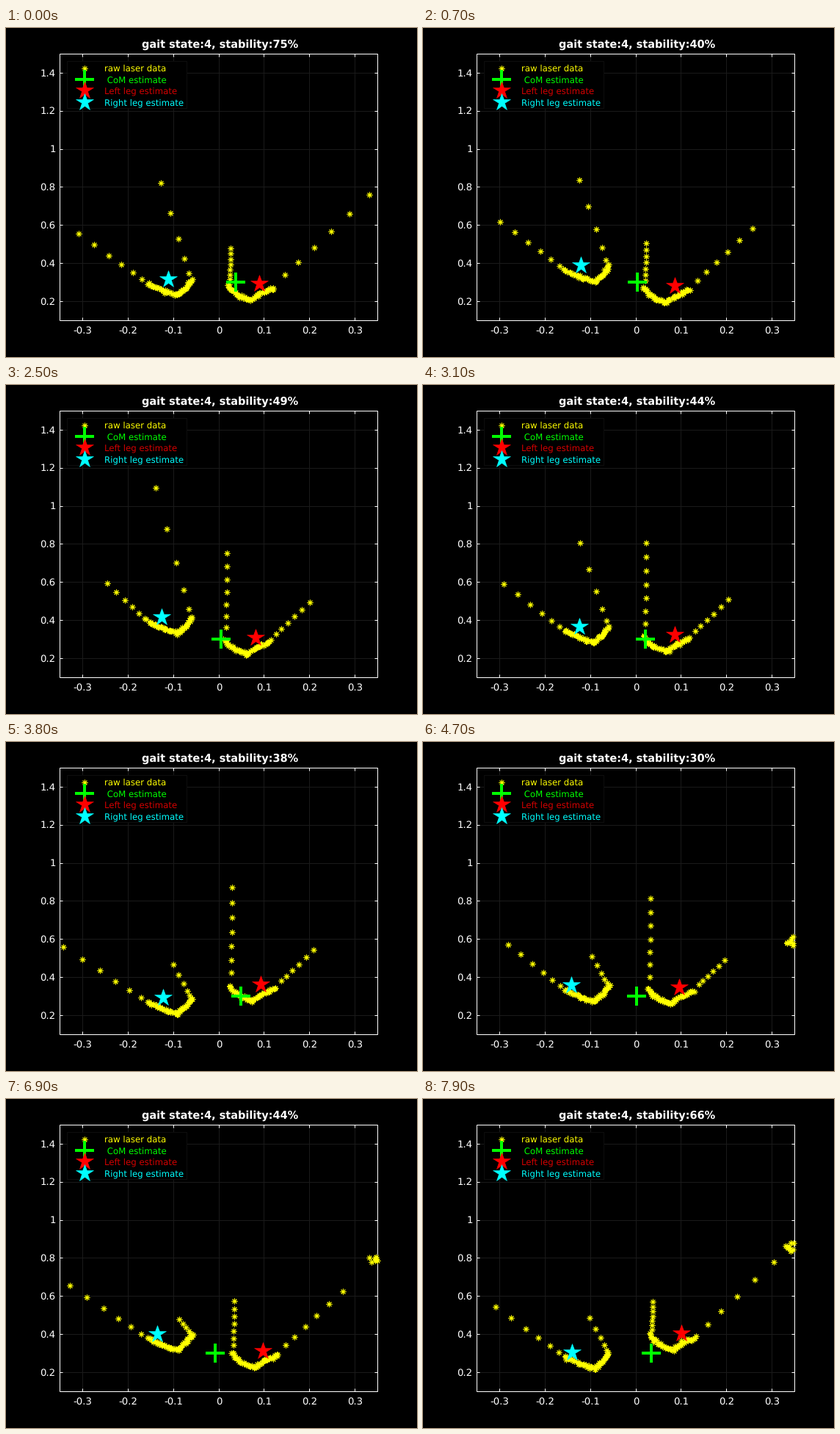
A matplotlib script that plays this animation: 560 px wide and 448 px high, repeating every 8000 ms.

```python
import numpy as np
import matplotlib.pyplot as plt
from matplotlib.animation import FuncAnimation
from matplotlib.patches import Rectangle

W, H, DPI = 560, 448, 64
FRAMES, STEP = 80, 100
YELLOW, GREEN, RED, CYAN = "#ffff00", "#00ff00", "#ff0000", "#00ffff"
GRID = "#1a1a1a"

plt.rcParams["font.family"] = "DejaVu Sans"
plt.rcParams["text.hinting"] = "none"


def px(n):
    return n * 72 / DPI


def sx(v):
    return 289.5 + 618.6 * v


def sy(v):
    return 423.9 - 259.3 * v


L, R, T, B = sx(-0.35), sx(0.35), sy(1.5), sy(0.1)

# ---- motion ----
# time, stability, CoM x, then per leg: star x, star y, tail reach, beam top
POSES = np.array([
    (0.0, 75, 313, 221, 342, 99, 211, 345, 348, 495, 300),
    (1.4, 5, 307, 208, 337, 111, 202, 341, 322, 402, 285),
    (2.5, 49, 293, 212, 316, 138, 140, 340, 344, 414, 229),
    (3.8, 38, 320, 214, 348, 78, 303, 347, 330, 419, 198),
    (4.7, 30, 291, 202, 331, 116, 292, 349, 334, 411, 213),
    (5.9, 21, 311, 208, 342, 74, 301, 348, 320, 412, 274),
    (7.9, 66, 311, 203, 345, 99, 298, 352, 319, 505, 276)])
TIMES = POSES[:, 0]


def blend(values, t):
    return np.interp(t, TIMES, values)


def gait(t):
    return np.cos(2 * np.pi * (t - 1.6) / 2.1)


def swing(t):
    """Stride left over after blending between poses."""
    return gait(t) - blend(gait(TIMES), t)


# ---- laser scan, in stage pixels ----
RIGHT_SHIN = [(193, 6), (215, 16), (233, 22), (246, 11), (253, 0)]
LEFT_SHIN = [(-43, 2), (-36, 10), (-27, 17), (-12, 23), (2, 13), (20, 5)]


def ray(start, end, n, power):
    """Hits that spread out from start to end."""
    u = (np.arange(1, n + 1)[:, None] / n) ** power
    return np.array(start) + u * (np.array(end) - start)


def arc(pts, origin, rng, n=46):
    """Dense, slightly noisy hits along a polyline."""
    p = np.array(pts, float) + origin
    d = np.r_[0, np.cumsum(np.hypot(*np.diff(p, axis=0).T))]
    q = np.linspace(0, d[-1], n)
    line = np.c_[np.interp(q, d, p[:, 0]), np.interp(q, d, p[:, 1])]
    return line + rng.normal(0, 1, (n, 2))


def right_leg(x, y, reach, top, rng):
    rise = 7 * np.sqrt(193 - reach)
    lean = 3.6 * np.sqrt(max(y - top, 0))
    return [arc(RIGHT_SHIN, (0, y), rng),
            ray((193, y + 6), (reach, y + 6 - rise), 6, 1.4),
            ray((252, y), (252 - lean, top), 5, 1.7)]


def left_leg(x, y, reach, top, rng):
    rise = 0.95 * (reach - x - 23)
    return [arc(LEFT_SHIN, (x, y), rng),
            ray((x + 23, y), (reach, y - rise), 6, 1.3),
            ray((x - 40, y), (x - 39, top), 7, 1.1)]


def passer(t, rng):
    """A small cluster that enters at the right edge and moves away."""
    x = np.interp(t, [3.8, 4.7], [535, 501])
    y = np.interp(t, [4.7, 5.9, 7.9], [272, 235, 202])
    return rng.normal((x, y), (3.5, 6 - 0.5 * t), (10, 2))


# ---- stage ----
fig = plt.figure(figsize=(W / DPI, H / DPI), dpi=DPI, facecolor="black")
ax = fig.add_axes([0, 0, 1, 1])
ax.set(xlim=(0, W), ylim=(H, 0))
ax.axis("off")


def line(x, y, color, z):
    ax.plot(x, y, color=color, lw=px(1), zorder=z, solid_capstyle="butt")


def label(x, y, s, size, color="white", **kw):
    return ax.text(x, y, s, fontsize=px(size), color=color, va="baseline",
                   zorder=4, **kw)


def frame(x, y, w, h, z, **kw):
    ax.add_patch(Rectangle((x, y), w, h, lw=px(1), zorder=z, **kw))


for v in np.arange(-3, 4) / 10:
    x = sx(v)
    line([x, x], [T, B], GRID, 1)
    line([x, x], [B, B - 4], "white", 3)
    line([x, x], [T, T + 4], "white", 3)
    label(x + 0.5, 416, f"{v:g}", 13.2, ha="center")
for v in np.arange(2, 15, 2) / 10:
    y = sy(v)
    line([L, R], [y, y], GRID, 1)
    line([L, L + 4], [y, y], "white", 3)
    line([R, R - 4], [y, y], "white", 3)
    label(67.5, y + 4.7, f"{v:g}", 13.2, ha="right")
frame(L, T, R - L, B - T, 3, fill=False, ec="white")
frame(83, 45, 163, 64, 2, fc="black", ec="#0e0e0e")
title = label(292, 27.2, "", 14.5, weight="bold", ha="center")


def marks(kind, size, color, z, width=0.5):
    return ax.plot([], [], ls="", marker=kind, ms=px(size), color=color,
                   mew=px(width), zorder=z, clip_on=False)[0]


STYLES = [((8, 2, 0), 7.8, YELLOW, 5, 1), ("+", 26, GREEN, 6, 4),
          ("*", 24.5, RED, 7), ("*", 24.5, CYAN, 8)]
NAMES = ["raw laser data", " CoM estimate", "Left leg estimate",
         "Right leg estimate"]
TINTS = [YELLOW, GREEN, "#d40000", CYAN]
for i, (style, name, tint) in enumerate(zip(STYLES, NAMES, TINTS)):
    y = 54.5 + 15.4 * i
    marks(*style).set_data([107], [y])
    label(133.5, y + 4.5, name, 11.7, tint)

dots, com, left_star, right_star = [marks(*s) for s in STYLES]


def draw(i):
    t = i * STEP / 1000
    s = swing(t)
    rng = np.random.default_rng(i + 1)
    score, cx, rx, ry, r_reach, r_top, lx, ly, l_reach, l_top = (
        blend(col, t) for col in POSES.T[1:])
    ry += 12 * s
    ly -= 12 * s

    pts = np.vstack(right_leg(rx, ry, r_reach, r_top, rng)
                    + left_leg(lx, ly, l_reach, l_top, rng)
                    + [passer(t, rng)])
    x, y = pts.T
    seen = (x >= L) & (x <= R) & (y >= T) & (y <= B)
    dots.set_data(x[seen], y[seen])

    com.set_data([cx + 13 * s], [346])
    right_star.set_data([rx], [ry])
    left_star.set_data([lx], [ly])
    title.set_text(f"gait state:4, stability:{score:.0f}%")
    return dots, com, left_star, right_star, title


anim = FuncAnimation(fig, draw, frames=FRAMES, interval=STEP, repeat=True,
                     repeat_delay=0, blit=False)
plt.show()
```
